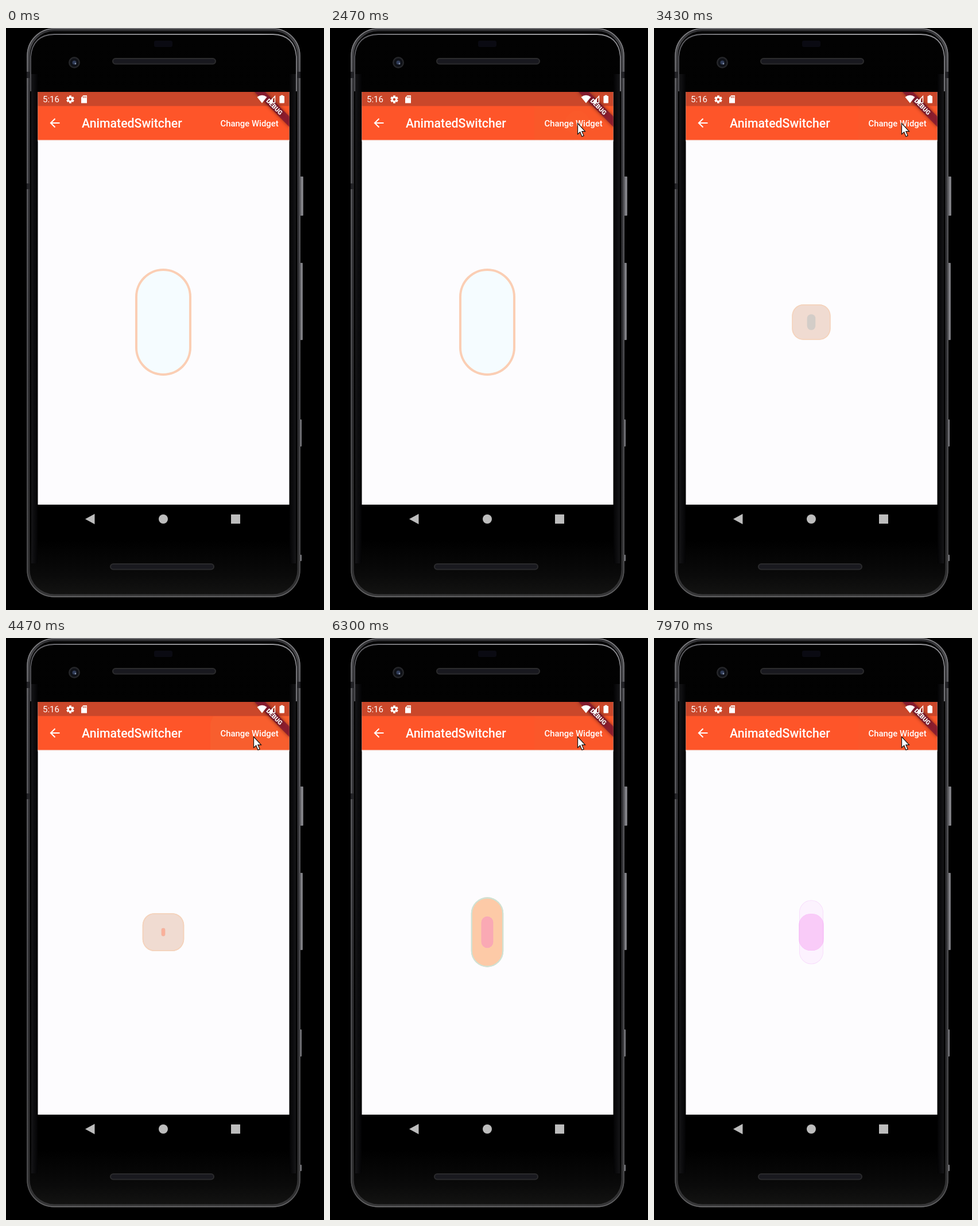
Write an HTML page with a canvas that moves like this. It is 554 by 1011 pixels and loops after 8 s.

```html
<!DOCTYPE html>
<html lang="en">
<head>
<meta charset="utf-8">
<title>AnimatedSwitcher</title>
<style>
  html, body { margin: 0; width: 100%; height: 100%; overflow: hidden; background: #000; }
  canvas { display: block; }
</style>
</head>
<body>
<canvas id="stage" width="554" height="1011"></canvas>
<script>
const W = 554, H = 1011, LOOP = 8000, SWITCH_MS = 1000;
const SCREEN = { x: 55.5, y: 111, w: 438, h: 717 };
const CENTER = { x: 274, y: 511 };
const STATUS = '#ca472a';
const stage = document.getElementById('stage').getContext('2d');

const widgets = [
  { w: 98, h: 186, r: 49, fill: '#f5fcff', line: '#fbceb4', lw: 4 },
  { w: 79, h: 72, r: 23, fill: '#f0dbd1', line: '#f5d3bc', lw: 2 },
  { w: 82, h: 176, r: 41, fill: '#fdcaa7', line: '#cbe4d8', lw: 3 },
  { w: 66, h: 175, r: 33, fill: 'rgba(225,70,245,.05)', line: 'rgba(230,140,245,.28)', lw: 1.2 },
  { w: 120, h: 175, r: 56, fill: 'rgba(235,70,225,.16)', line: 'rgba(235,130,245,.25)', lw: 1.2 }
];

// The tint marks where the outgoing and incoming widgets overlap.
const switches = [
  { press: 2440, start: 2580, tint: 'rgba(150,175,180,.32)' },
  { press: 4250, start: 4390, tint: 'rgba(240,110,120,.28)' },
  { press: 5880, start: 5990, tint: 'rgba(245,100,200,.28)' },
  { press: 7480, start: 7605, tint: 'rgba(240,80,230,.08)' }
];

const cursorPath = [
  [1500, 304, 292], [1529, 304, 292], [1530, 373, 287], [1700, 373, 287],
  [1900, 412, 214], [2130, 431, 165], [3930, 431, 165], [4070, 431, 171], [LOOP, 431, 171]
];

const clamp = v => Math.max(0, Math.min(1, v));

function box(g, x, y, w, h, r = 0) {
  g.beginPath();
  g.roundRect(x, y, w, h, r);
}

function fillBox(g, color, ...rect) {
  g.fillStyle = color;
  box(g, ...rect);
  g.fill();
}

function poly(g, color, points) {
  g.fillStyle = color;
  g.beginPath();
  points.forEach(([x, y]) => g.lineTo(x, y));
  g.closePath();
  g.fill();
}

function disc(g, color, x, y, r) {
  g.fillStyle = color;
  g.beginPath();
  g.arc(x, y, r, 0, Math.PI * 2);
  g.fill();
}

function gradient(g, x0, y0, x1, y1, stops) {
  const paint = g.createLinearGradient(x0, y0, x1, y1);
  stops.forEach(([at, color]) => paint.addColorStop(at, color));
  return paint;
}

function label(g, text, x, y, size, weight = 500) {
  g.font = `${weight} ${size}px Roboto, sans-serif`;
  g.fillStyle = '#fff';
  g.fillText(text, x, y);
}

function layer(paint) {
  const canvas = document.createElement('canvas');
  canvas.width = W;
  canvas.height = H;
  paint(canvas.getContext('2d'));
  return canvas;
}

function drawPhone(g) {
  g.fillStyle = '#000';
  g.fillRect(0, 0, W, H);
  for (const [y, h, w] of [[258, 68, 6], [408, 134, 5], [680, 47, 3], [915, 11, 3]]) {
    const metal = gradient(g, 512, 0, 512 + w, 0, [[0, '#4c4c52'], [.6, '#8e8e93'], [1, '#66666b']]);
    fillBox(g, metal, 512, y, w, h, 1);
  }

  fillBox(g, gradient(g, 0, 0, 0, H, [
    [0, '#020202'], [.88, '#000'], [.94, '#0a0a0a'], [.97, '#121211'], [1, '#080808']
  ]), 36, 1, 477, 988, 47);

  // Metal rim: brighter at its outer edge, fading to glass.
  g.lineWidth = 5;
  g.strokeStyle = gradient(g, 0, 0, 0, H, [
    [0, '#2c2c2f'], [.03, '#48484b'], [.1, '#3b3b3f'], [.6, '#2d2d30'], [.96, '#303031'], [1, '#454547']
  ]);
  box(g, 39, 3, 471, 983, 45);
  g.stroke();
  g.lineWidth = 1.5;
  g.strokeStyle = gradient(g, 0, 0, 0, H, [
    [0, '#8a8a8d'], [.1, '#747478'], [.6, '#5d5d61'], [.95, '#555557'], [1, '#858587']
  ]);
  box(g, 37, 1, 475, 987, 47);
  g.stroke();

  g.lineWidth = 1.8;
  g.strokeStyle = gradient(g, 36, 0, 513, 0, [[0, '#55555a'], [.15, '#77777b'], [.85, '#a5a5a8'], [1, '#808085']]);
  g.beginPath();
  g.moveTo(43, 110);
  g.lineTo(43, 50);
  g.quadraticCurveTo(46, 12, 84, 11);
  g.lineTo(465, 11);
  g.quadraticCurveTo(503, 12, 506, 50);
  g.lineTo(506, 110);
  g.stroke();

  fillBox(g, gradient(g, 44, 0, 55, 0, [[0, '#151517'], [.5, '#0c0c0e'], [1, '#030304']]), 44, 80, 11, 850);
  fillBox(g, gradient(g, 505, 0, 494, 0, [[0, '#151517'], [.5, '#0c0c0e'], [1, '#030304']]), 494, 80, 11, 850);
  for (const x of [36, 508]) fillBox(g, '#222226', x, 76, 5, 11);
  fillBox(g, '#222226', 36, 270, 5, 10);

  fillBox(g, '#0a0a12', 258, 22, 32, 11, 3);
  disc(g, '#252629', 119, 60, 10);
  disc(g, '#0f1117', 119, 60, 7.5);
  disc(g, '#303c58', 119, 60, 3.5);
  disc(g, '#8591a8', 121, 62, 1.4);
  for (const [x, y, w] of [[185, 52, 181], [181, 930, 182]]) {
    fillBox(g, '#2b2b2d', x, y, w, 11.5, 6);
    fillBox(g, '#19191f', x + 2, y + 2, w - 4, 7.5, 4);
  }

  fillBox(g, '#000', SCREEN.x, SCREEN.y, SCREEN.w, 770);
  fillBox(g, '#fdfcfe', SCREEN.x, SCREEN.y, SCREEN.w, SCREEN.h);
  fillBox(g, gradient(g, 0, 194, 0, 197, [[0, '#f3e2dd'], [1, '#fdfcfe']]), SCREEN.x, 194, SCREEN.w, 3);
  fillBox(g, '#fe5529', SCREEN.x, 135, SCREEN.w, 59.5);
  fillBox(g, STATUS, SCREEN.x, SCREEN.y, SCREEN.w, 24.5);

  poly(g, '#bdbdbd', [[138, 853], [154.5, 844], [154.5, 862]]);
  disc(g, '#bdbdbd', 274, 853, 8);
  fillBox(g, '#bdbdbd', 392, 845, 16, 16);
}

function drawGear(g, x, y) {
  g.save();
  g.translate(x, y);
  for (let i = 0; i < 6; i++) {
    g.rotate(Math.PI / 3);
    fillBox(g, '#fff', -2, -6.7, 4, 4, .6);
  }
  disc(g, '#fff', 0, 0, 5);
  disc(g, STATUS, 0, 0, 2.2);
  g.restore();
}

function drawBanner(g) {
  g.save();
  box(g, SCREEN.x, SCREEN.y, SCREEN.w, SCREEN.h);
  g.clip();
  g.translate(SCREEN.x + SCREEN.w, SCREEN.y);
  g.rotate(Math.PI / 4);
  g.shadowColor = 'rgba(0,0,0,.5)';
  g.shadowBlur = 6;
  fillBox(g, 'rgba(135,25,50,.85)', -43, 30, 86, 12.8);
  g.textAlign = 'center';
  label(g, 'DEBUG', 0, 40.3, 10.8, 900);
  g.restore();
}

function drawBars(g) {
  label(g, '5:16', 64, 129, 15, 400);
  drawGear(g, 112, 124);
  poly(g, '#fff', [[131, 121], [134.5, 117], [141, 117], [141, 130.5], [131, 130.5]]);
  for (const x of [134, 136.3, 138.6]) fillBox(g, STATUS, x, 118.5, 1.1, 3);

  g.strokeStyle = '#fff';
  g.lineWidth = 2.1;
  g.beginPath();
  g.moveTo(93.5, 165);
  g.lineTo(78, 165);
  g.moveTo(85.5, 157.4);
  g.lineTo(77.9, 165);
  g.lineTo(85.5, 172.6);
  g.stroke();

  label(g, 'AnimatedSwitcher', 132, 173, 21.3);
  label(g, 'Change Widget', 373.5, 171, 14.9);
  drawBanner(g);

  g.fillStyle = '#fff';
  g.beginPath();
  g.moveTo(446, 130.5);
  g.lineTo(437.5, 120);
  g.quadraticCurveTo(446, 113.5, 454.5, 120);
  g.fill();
  g.strokeStyle = '#fff';
  g.lineWidth = 1.4;
  g.beginPath();
  g.moveTo(457.5, 129.8);
  g.lineTo(468.5, 129.8);
  g.lineTo(468.5, 118.5);
  g.closePath();
  g.stroke();
  poly(g, '#fff', [[457, 130], [465, 130], [465, 122]]);
  fillBox(g, '#fff', 476.5, 118, 8.5, 12.5, 1);
  fillBox(g, '#fff', 478.7, 116.7, 4, 2);
}

function scaledBox(item, scale) {
  const w = item.w * scale, h = item.h * scale;
  box(stage, CENTER.x - w / 2, CENTER.y - h / 2, w, h, item.r * scale);
}

function drawWidget(item, scale) {
  if (scale <= 0) return;
  scaledBox(item, scale);
  stage.fillStyle = item.fill;
  stage.fill();
  stage.save();
  stage.clip();
  stage.strokeStyle = item.line;
  stage.lineWidth = item.lw * scale * 2;
  stage.stroke();
  stage.restore();
}

function drawSwitcher(time) {
  const index = switches.findLastIndex(s => time >= s.start);
  if (index < 0) return drawWidget(widgets[0], 1);
  const { start, tint } = switches[index];
  const grow = clamp((time - start) / SWITCH_MS);
  const before = widgets[index], after = widgets[index + 1];
  drawWidget(before, 1 - grow);
  drawWidget(after, grow);
  if (grow <= 0 || grow >= 1) return;
  stage.save();
  scaledBox(before, 1 - grow);
  stage.clip();
  scaledBox(after, grow);
  stage.fillStyle = tint;
  stage.fill();
  stage.restore();
}

function drawButton(time, [x, y]) {
  if (x < 356 || y > 194) return;
  const tap = switches.findLast(s => time >= s.press);
  const age = tap ? time - tap.press : 0;
  const pressed = clamp(age / 120) * clamp((420 - age) / 250);
  stage.save();
  box(stage, 356, 136, 137.5, 58);
  stage.clip();
  stage.fillStyle = `rgba(200,120,50,${.06 + .05 * pressed})`;
  stage.fill();
  if (pressed > 0) disc(stage, `rgba(220,190,120,${.06 * pressed})`, x, y, 12 + age * .3);
  stage.restore();
}

function cursorAt(time) {
  const next = cursorPath.findIndex(p => p[0] > time);
  if (next < 1) return null;
  const [t0, x0, y0] = cursorPath[next - 1];
  const [t1, x1, y1] = cursorPath[next];
  const k = (time - t0) / (t1 - t0);
  return [x0 + (x1 - x0) * k, y0 + (y1 - y0) * k];
}

function drawCursor([x, y]) {
  stage.save();
  stage.translate(x + .5, y + .5);
  poly(stage, '#fff', [[0, 0], [0, 19], [4.2, 15.2], [7.4, 23], [10.6, 21.6], [7.4, 14.2], [13, 14.2]]);
  stage.strokeStyle = '#111';
  stage.lineWidth = 1.2;
  stage.stroke();
  stage.restore();
}

const phone = layer(drawPhone);
const bars = layer(drawBars);

function render(now) {
  const time = now % LOOP;
  const tip = cursorAt(time);
  stage.drawImage(phone, 0, 0);
  if (tip) drawButton(time, tip);
  drawSwitcher(time);
  stage.drawImage(bars, 0, 0);
  if (tip) drawCursor(tip);
  requestAnimationFrame(() => render(performance.now() - origin));
}

const origin = performance.now();
render(0);
</script>
</body>
</html>
```
